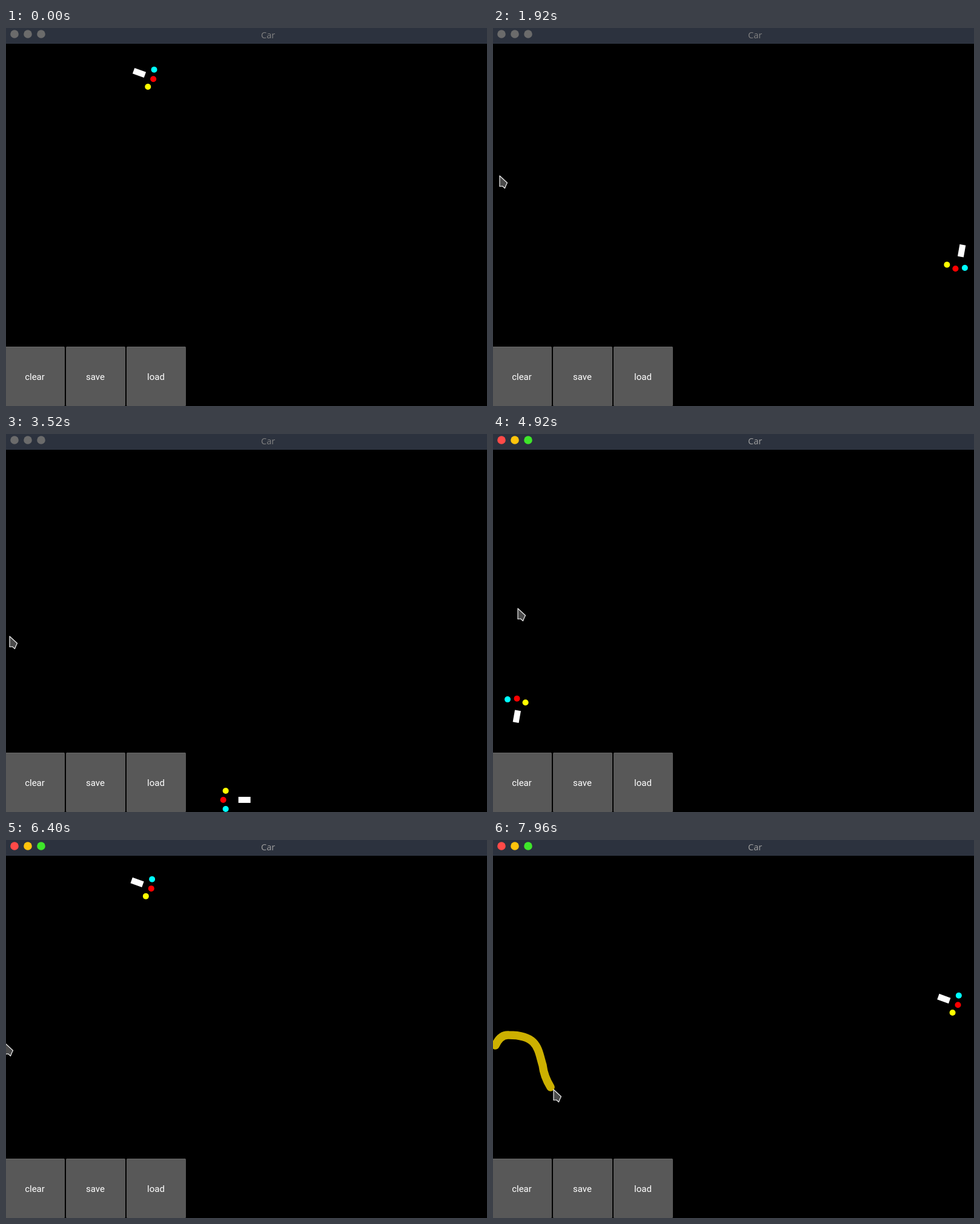
Recreate the animation shown at these times as an HTML page. Size 794 by 624 pixels, loop 8 s.

```html
<!DOCTYPE html>
<html lang="en">
<head>
<meta charset="utf-8">
<title>Car</title>
<style>
  html, body { margin: 0; width: 100%; height: 100%; overflow: hidden; background: #000; }
  svg { display: block; width: 794px; height: 624px; }
  .bar { fill: #2c323e; }
  .title { font: 14.5px "Open Sans", sans-serif; fill: #828282; }
  .light { fill: #6b6b6b; }
  .focused .title { fill: #a0a0a0; }
  .focused .close { fill: #ff4a48; }
  .focused .minimise { fill: #ffc40c; }
  .focused .zoom { fill: #3ee62a; }
  .button rect { fill: #585858; }
  .button path { stroke: #666; }
  .button text { font: 15px Roboto, sans-serif; fill: #fff; text-anchor: middle; }
  #sand { fill: none; stroke: #ccb000; stroke-width: 13.5; stroke-linecap: round; }
  #cursor { fill: #4a4a4a; stroke: #eee; stroke-width: 1.2; stroke-linejoin: round; }
</style>
</head>
<body>
<svg viewBox="0 0 794 624">
  <rect width="794" height="624"/>
  <path id="sand" d="M4 339Q12 321 26 322C75 322 74 346 82 372Q84 390 95 408"/>
  <rect id="car" x="-10" y="-5" width="20" height="10" fill="#fff"/>
  <circle class="sensor" r="5" fill="#f00"/>
  <circle class="sensor" r="5" fill="#ff0"/>
  <circle class="sensor" r="5" fill="#0ff"/>
  <g id="buttons"></g>
  <g id="window">
    <rect class="bar" width="794" height="26"/>
    <circle class="light close" cx="14" cy="10" r="6.8"/>
    <circle class="light minimise" cx="36" cy="10" r="6.8"/>
    <circle class="light zoom" cx="58" cy="10" r="6.8"/>
    <text class="title" x="421" y="17">Car</text>
  </g>
  <path id="cursor" d="M0 0V17.5L4.5 17L8.5 20.5L10.5 15.5L12.5 11.5Z"/>
</svg>
<script>
const LOOP = 8000, STEP = 40;
const FOCUS_AT = 4000, DRAW_AT = 7560, DRAW_MS = 400;
const SPEED = 0.36, TURN_RADIUS = 17.2, TURN_MS = 74, TURN_STEP = 20;
const SENSOR_REACH = 30, SENSOR_SPREAD = 30;

// Each drive ends at a wall with a right turn.
const drives = [
  { run: 591, turn: 80 },
  { run: 299, turn: 80 },
  { run: 682, turn: 100 },
  { run: 538.6, turn: 100 },
  { run: Infinity, turn: 0 }
];
// Resting points of the pointer: time, x, y.
const stops = [
  [0, 24, -30], [540, 40, 550], [1080, 27, 238], [1920, 11, 244], [3520, 6, 334],
  [4150, 60, 580], [4920, 41, 288], [5400, -16, 310], [6400, -1, 336]
];

const $ = id => document.getElementById(id);
const sand = $('sand'), car = $('car'), cursor = $('cursor');
const sensors = document.querySelectorAll('.sensor');
const sandLength = sand.getTotalLength();

const rad = deg => deg * Math.PI / 180;
const clamp01 = v => Math.min(1, Math.max(0, v));
const mix = (a, b, k) => a + (b - a) * k;
const ease = k => k * k * (3 - 2 * k);
const ahead = (x, y, deg, dist) => [x + dist * Math.cos(rad(deg)), y + dist * Math.sin(rad(deg))];

function arc(x, y, heading, angle) {
  const centre = ahead(x, y, heading + 90, TURN_RADIUS);
  return ahead(...centre, heading + angle - 90, TURN_RADIUS);
}

function carAt(t) {
  let x = 220, y = 74, heading = 20;
  for (const { run, turn } of drives) {
    const runMs = run / SPEED;
    if (t <= runMs) return [...ahead(x, y, heading, t * SPEED), heading];
    t -= runMs;
    [x, y] = ahead(x, y, heading, run);
    const angle = turn * clamp01(t / TURN_MS);
    [x, y] = arc(x, y, heading, angle);
    heading += TURN_STEP * Math.round(angle / TURN_STEP);
    if (t <= TURN_MS) return [x, y, heading];
    t -= TURN_MS;
  }
}

function pointerAt(t) {
  if (t > DRAW_AT) {
    const tip = sand.getPointAtLength(sandLength * clamp01((t - DRAW_AT) / DRAW_MS));
    return [tip.x + 5, tip.y + 4];
  }
  const next = Math.max(1, stops.findIndex(stop => stop[0] > t));
  const [from, to] = t < stops.at(-1)[0] ? [stops[next - 1], stops[next]] : [stops.at(-1), stops.at(-1)];
  const k = ease(clamp01((t - from[0]) / (to[0] - from[0] || 1)));
  return [mix(from[1], to[1], k), mix(from[2], to[2], k)];
}

function draw(t) {
  const [x, y, heading] = carAt(t);
  car.setAttribute('transform', `translate(${x} ${y}) rotate(${heading})`);
  sensors.forEach((dot, i) => {
    const side = [0, 1, -1][i];
    const [cx, cy] = ahead(x - 5, y, heading + side * SENSOR_SPREAD, SENSOR_REACH);
    dot.setAttribute('cx', cx);
    dot.setAttribute('cy', cy);
  });

  const drawn = clamp01((t - DRAW_AT) / DRAW_MS);
  sand.style.visibility = drawn > 0 ? 'visible' : 'hidden';
  sand.style.strokeDasharray = `${sandLength * drawn} ${sandLength * 2}`;
  cursor.setAttribute('transform', `translate(${pointerAt(t)})`);
  $('window').classList.toggle('focused', t >= FOCUS_AT);
}

$('buttons').innerHTML = ['clear', 'save', 'load'].map((label, i) => {
  const x = i * 100 - 1;
  return `<g class="button"><rect x="${x}" y="526" width="98" height="98" rx="1.5"/>
    <path d="M${x + 1} 526.5h96"/>
    <text x="${47.5 + i * 100}" y="581">${label}</text></g>`;
}).join('');

const began = performance.now();
function tick(now) {
  const t = Math.max(0, now - began) % LOOP;
  draw(Math.floor(t / STEP) * STEP);
  requestAnimationFrame(tick);
}
draw(0);
requestAnimationFrame(tick);
</script>
</body>
</html>
```
